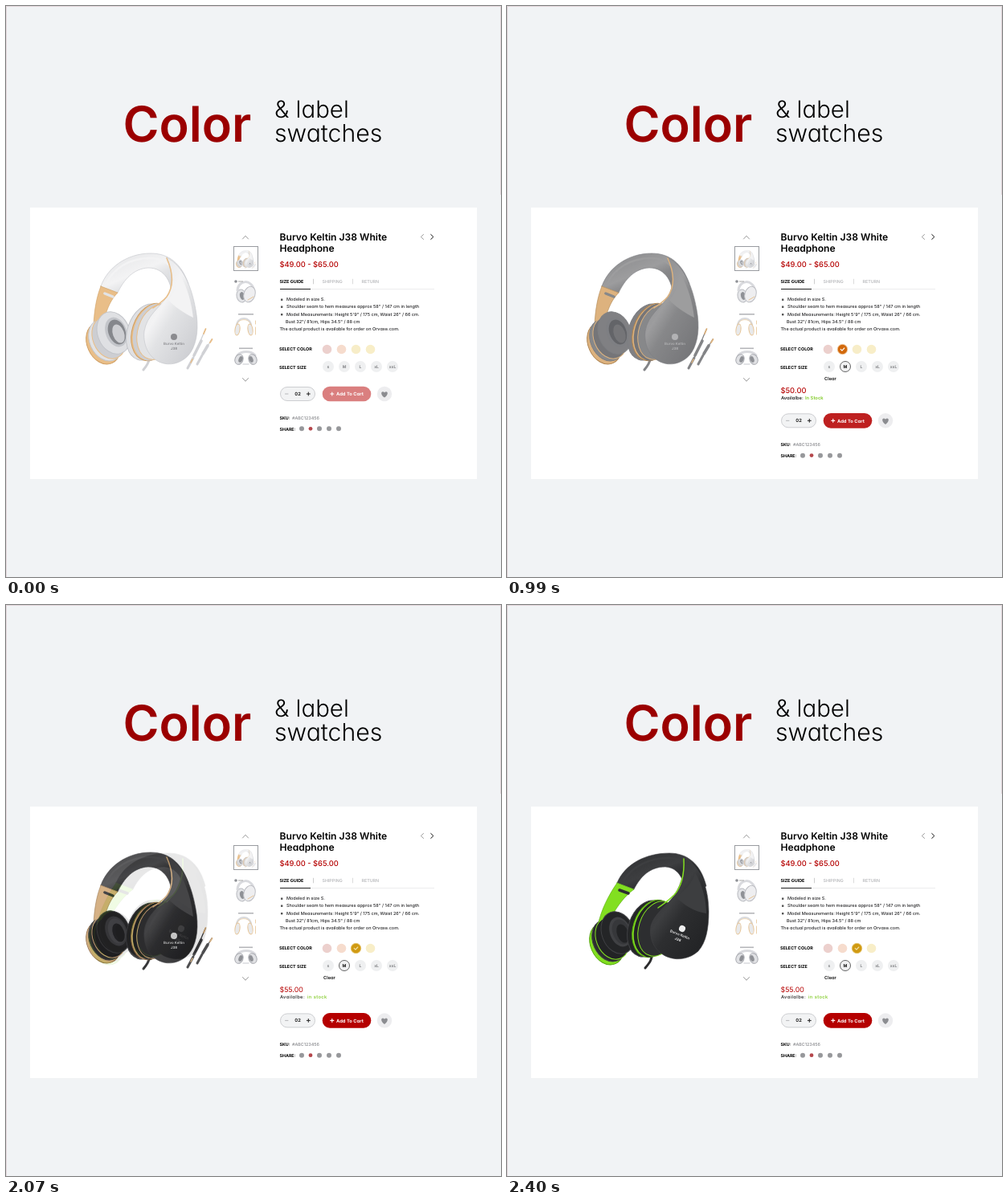
An HTML page that plays this animation: 616 px wide and 711 px high, repeating every 2.67 s.

```html
<!DOCTYPE html>
<html lang="en">
<head>
<meta charset="utf-8">
<title>Color and label swatches</title>
<style>
  html, body { margin: 0; width: 100%; height: 100%; overflow: hidden; background: #f1f3f5; }
  svg { display: block; width: 616px; height: 711px; font-family: Inter, "Open Sans", sans-serif; font-feature-settings: "cv11"; text-rendering: geometricPrecision; }
  #photos { isolation: isolate; }
  #photos > g { mix-blend-mode: plus-lighter; }
</style>
</head>
<body>
<svg id="stage" viewBox="0 0 616 711" xmlns="http://www.w3.org/2000/svg"></svg>
<script>
const LOOP = 2670, STEP = 30;
const RED = '#b50000';

const text = (x, y, size, weight, fill, str, extra = '') =>
  `<text x="${x}" y="${y}" font-size="${size}" font-weight="${weight}" fill="${fill}" ${extra}>${str}</text>`;
const path = (d, fill, stroke = 'none', width = 1) =>
  `<path d="${d}" fill="${fill}" stroke="${stroke}" stroke-width="${width}" stroke-linecap="round" stroke-linejoin="round"/>`;
const line = (d, color, width = 1) => path(d, 'none', color, width);
const rect = (x, y, w, h, fill, extra = '') =>
  `<rect x="${x}" y="${y}" width="${w}" height="${h}" fill="${fill}" ${extra}/>`;
const circle = (x, y, r, fill, extra = '') =>
  `<circle cx="${x}" cy="${y}" r="${r}" fill="${fill}" ${extra}/>`;
const oval = (x, y, rx, ry, turn, fill, stroke = 'none') =>
  `<ellipse rx="${rx}" ry="${ry}" transform="translate(${x} ${y}) rotate(${turn})" fill="${fill}" stroke="${stroke}"/>`;
const group = (id, body, extra = '') => `<g id="${id}" ${extra}>${body}</g>`;

const palettes = {
  white: { light: '#f3f3f4', mid: '#e2e3e5', dark: '#cdced2', pad: '#dfe0e3', edge: '#c3c5ca', hole: '#85878c', accent: '#e9be88', deep: '#cf9f64', ink: '#8b8b8f', wire: '#d0d1d5' },
  black: { light: '#454547', mid: '#2b2b2d', dark: '#1c1c1e', pad: '#1f1f21', edge: '#38383b', hole: '#404043', accent: '#cfa674', deep: '#8f6a40', ink: '#d8d8d8', wire: '#353537' },
  green: { light: '#3d3e40', mid: '#2d2e30', dark: '#222325', pad: '#242527', edge: '#404144', hole: '#36373a', accent: '#82df20', deep: '#56a80e', ink: '#eeeeee', wire: '#2b2b2d' }
};

const upright = {
  band: 'M118 349C126 326 150 308 180 308C202 308 218 320 227 346L206 366C208 346 198 326 177 326C159 327 147 340 139 357Z',
  sheen: 'M125 345C134 327 153 314 179 314C192 314 200 318 206 326',
  slider: 'M118 349L139 357C131 365 126 376 123 388L109 396C110 380 112 364 118 349Z',
  notch: 'M123 358L133 362',
  face: 'M200 313C221 324 231 350 236 378C240 400 238 418 230 431C222 443 208 448 196 445C180 441 170 425 172 405C175 385 192 375 200 362C208 350 208 332 200 313Z',
  gloss: 'M215 332C226 350 231 370 233 388C221 382 209 374 202 366C210 355 214 345 215 332Z',
  trim: 'M200 314C208 332 209 349 200 362C195 368 189 372 183 376',
  left: [121, 420], pad: [134, 407], ring: [183, 406], mark: [209, 412], turn: 0,
  wire: 'M179 436C178 444 175 448 171 453', mic: true
};
const tilted = {
  band: 'M137 346C147 322 173 309 202 309C224 309 241 322 248 350L218 365C224 346 215 327 197 326C178 326 166 338 158 354Z',
  sheen: 'M145 343C156 326 176 315 201 315C212 315 220 318 227 325',
  slider: 'M137 346L158 354C146 363 138 374 130 388L113 399C117 380 126 362 137 346Z',
  notch: 'M140 355L151 359',
  face: 'M220 314C241 326 251 352 251 382C251 402 248 420 238 431C228 440 214 443 202 439C186 434 176 418 179 400C183 384 200 374 209 360C218 346 221 330 220 314Z',
  gloss: 'M234 333C244 350 248 368 248 384C234 382 220 374 211 364C222 354 231 346 234 333Z',
  trim: 'M220 316C221 338 217 351 208 361C201 368 194 373 188 377',
  left: [124, 422], pad: [138, 408], ring: [183, 403], mark: [218, 403], turn: 22,
  wire: 'M180 432C181 441 178 445 172 452', mic: false
};

function headphone(id, shape, extra = '') {
  const c = palettes[id], [lx, ly] = shape.left, [px, py] = shape.pad, [rx, ry] = shape.ring;
  const shell = `url(#shell-${id})`;
  const label = `<g transform="translate(${shape.mark}) rotate(${shape.turn})" text-anchor="middle">
    ${circle(0, 0, 4, c.ink)}${text(0, 9.5, 4.4, 600, c.ink, 'Burvo Keltin')}${text(0, 16, 4.4, 700, c.ink, 'J38')}</g>`;
  const mic = !shape.mic ? '' :
    line('M226 451L233 438M238 446L244 435', c.wire, 3) + line('M233 438L248 403M244 435L256 415', c.wire, 1.3) +
    line('M234 435L243 417M245 433L251 423', c.wire, 3.6) + line('M246 408L248.5 402M254 419L256.5 415', c.accent, 1.8) +
    line('M230 444L232 440', c.accent, 1.6);
  return group(id,
    line(shape.wire, c.wire, 3) + mic +
    path(shape.band, shell, c.edge, .6) + line(shape.sheen, c.light, 2.5) +
    path(shape.slider, c.accent, c.deep, .6) + line(shape.notch, c.mid, 3.5) +
    oval(lx, ly, 20, 27, -24, c.accent, c.deep) + oval(lx + 3, ly - 4, 20, 27, -24, c.mid, c.edge) +
    oval(lx + 7, ly - 7, 20, 27, -22, c.dark, c.accent) +
    oval(px, py, 20, 27, -20, c.pad, c.edge) + oval(px + 3, py - 1, 13, 19, -20, c.edge) +
    oval(px + 4, py - 1, 10.5, 16, -20, c.hole) + oval(px + 6, py + 1, 7, 12, -20, c.dark) +
    oval(rx - 8, ry, 24, 36, 18, c.pad, c.edge) + oval(rx - 1, ry, 25, 36.5, 18, c.accent, c.deep) +
    oval(rx + 1, ry, 25, 36.5, 18, c.dark) + oval(rx + 5, ry, 24, 35, 18, c.mid, c.accent) +
    path(shape.face, shell, c.edge, .6) + path(shape.gloss, c.light) +
    line(shape.trim, c.accent, 1.5) + label, extra);
}

const gradients = Object.entries(palettes).map(([id, c]) =>
  `<linearGradient id="shell-${id}" x1="0" y1="0" x2=".8" y2="1"><stop stop-color="${c.mid}"/>
   <stop offset=".45" stop-color="${c.light}"/><stop offset=".6" stop-color="${c.mid}"/>
   <stop offset="1" stop-color="${c.dark}"/></linearGradient>`).join('');

function thumbnails() {
  const grey = '#d9dade', dark = '#8f9196', gold = '#e6c496';
  const side = oval(293, 361, 6, 8, -15, '#e4e5e8', '#b9bbc0') + oval(294, 361, 3, 5, -15, dark) +
    line('M288 354C289 341 306 339 309 355', grey, 3) + oval(303, 359, 7, 10, 18, '#eeeef0', '#bdbec3') +
    line('M301 366L308 362', gold) + circle(286, 343, 1.8, dark) + rect(289, 342.5, 6, 1, '#aaa');
  const front = rect(289, 383, 19, 1.6, '#b5b6ba') + line('M287 401C285 385 307 385 305 401', grey, 2.2) +
    line('M287 401C285 387 307 387 305 401', gold, .7) + oval(288, 403, 3, 7, 8, '#e8e9eb', gold) +
    oval(304, 403, 3, 7, -8, '#e8e9eb', gold) + line('M310.5 392V396M310.5 400V409', gold, .8);
  const folded = rect(290, 425.5, 17, 1.6, '#b5b6ba') + line('M288 435C293 429 305 429 310 435', grey, 3) +
    oval(290, 440, 5, 6.5, 20, '#e0e1e4', '#aaacb2') + oval(307, 440, 5, 6.5, -20, '#e0e1e4', '#aaacb2') +
    oval(292, 440, 2.5, 4, 20, dark) + oval(305, 440, 2.5, 4, -20, dark) + line('M295 446H302', grey, 1.5);
  return line('M294.5 290L298 286.2L301.5 290M294.5 463.5L298 467.3L301.5 463.5', '#999') +
    rect(283.5, 299.5, 30, 30, '#fff', 'stroke="#999ba0"') +
    '<use href="#white-small" transform="translate(270.5 255.5) scale(.158)"/>' + side + front + folded;
}

const colors = [399.5, 417.5, 435.5, 453.5];
const tints = ['#ecd0cd', '#f6dccd', '#f7edc8', '#f8eec8'];
const chosen = (id, x, fill, ring, tick) => group(id,
  circle(x, 427.5, 6.2, fill, `stroke="${ring}" stroke-width=".9"`) + line(`M${x - 2.3} 427.4l1.7 1.7l2.9-3.1`, tick, 1.1));

const details = [[349, 367, 'Modeled in size S.'],
  [349, 376, 'Shoulder seam to hem measures approx 58" / 147 cm in length'],
  [349, 386, 'Model Measurements: Height 5\'9" / 175 cm, Waist 26" / 66 cm.'],
  [348, 395, 'Bust 32"/ 81cm, Hips 34.5" / 88 cm'],
  [340.5, 404, 'The actual product is available for order on Orvaxe.com.']];

const sizes = ['s', 'M', 'L', 'xL', 'xxL'].map((s, i) =>
  circle(401 + 20 * i, 449, 7, '#eff0f1') +
  text(401 + 20 * i, 451, 5, 700, '#858689', s, 'text-anchor="middle"')).join('');

const info =
  text(340.5, 292, 12.1, 600, '#000', 'Burvo Keltin J38 White') + text(340.5, 306, 12.1, 600, '#000', 'Headphone') +
  line('M519.5 284.5L516.3 287.5L519.5 290.5', '#999') + line('M528.7 284.5L531.9 287.5L528.7 290.5', '#111') +
  text(340.5, 325, 9.3, 500, RED, '$49.00 - $65.00') +
  text(340.5, 345, 5.4, 700, '#000', 'SIZE GUIDE') + text(381.5, 345, 5.4, 400, '#888', '|') +
  text(393.5, 345, 5.3, 600, '#b9babd', 'SHIPPING') + text(430.5, 345, 5.4, 400, '#aaa', '|') +
  text(442.5, 345, 5.3, 600, '#b9babd', 'RETURN') +
  rect(341, 352, 192, 1, '#ececee') + rect(341, 352, 38, 1, '#222') +
  [365, 374, 383.5].map(y => rect(342, y - .5, 2.4, 2.4, '#555')).join('') +
  details.map(([x, y, s]) => text(x, y, 5.5, 500, '#262628', s)).join('') +
  text(340, 429.4, 5.4, 700, '#000', 'SELECT COLOR') + text(340, 452, 5.4, 700, '#000', 'SELECT SIZE') +
  colors.map((x, i) => circle(x, 427.5, 5.8, tints[i])).join('') + sizes +
  chosen('orange', colors[1], '#d2690c', '#f0c79a', '#fff') + chosen('ochre', colors[2], '#d09a12', '#e6c56b', '#f3e2a8') +
  group('medium', circle(421, 449, 6.5, '#f1f1f2', 'stroke="#666"') + text(421, 451, 5.2, 700, '#111', 'M', 'text-anchor="middle"')) +
  group('clear', text(395, 466, 5.7, 600, '#111', 'Clear'));

const stock = (id, price, size, weight, label, x, word, spacing) => group(id,
  text(340.5, 482, size, weight, RED, price) +
  text(341, 490.2, 5.8, weight + 100, '#222', label, `letter-spacing="${spacing}"`) +
  text(x, 490.2, 5.8, weight + 100, '#7cc81e', word, `letter-spacing="${spacing}"`));

const order = group('order',
  rect(341.5, 474.5, 43, 17, '#f2f3f4', 'rx="8.5" stroke="#cdced1"') +
  line('M347.5 483H351', '#b5b6b9') + text(363, 485.1, 5.8, 700, '#222', '02', 'text-anchor="middle"') +
  line('M374.3 483H378.3M376.3 481V485', '#222') +
  rect(393.7, 473.7, 60.6, 18.6, RED, 'id="button" rx="9.3"') +
  line('M403.8 483H407.8M405.8 481V485', '#fff', 1.1) + text(411, 485.2, 5.8, 700, '#fff', 'Add To Cart') +
  circle(471, 483, 9.2, '#ededef') +
  path('M471 487.6C466.4 484.6 466.2 480.2 469 480.2C470.2 480.2 471 481.2 471 481.8C471 481.2 471.8 480.2 473 480.2C475.8 480.2 475.6 484.6 471 487.6Z', '#8b8c90') +
  text(340.5, 515, 5.3, 700, '#000', 'SKU:') + text(356, 515, 5.4, 500, '#85868a', '#ABC123456') +
  text(340.5, 529, 5.3, 700, '#000', 'SHARE:') +
  [368, 379, 390, 402, 414].map((x, i) => circle(x, 526.3, i === 1 ? 2.4 : 3, i === 1 ? '#b5474c' : '#97989b')).join(''));

document.getElementById('stage').innerHTML =
  `<defs>${gradients}${headphone('white', upright).replace('id="white"', 'id="white-small"')}</defs>` +
  rect(0, 0, 616, 711, '#f1f3f5') +
  rect(0, 0, 616, 1, '#e2d6da') + rect(0, 0, 1, 711, '#e2d6da') + rect(615, 0, 1, 235, '#e2d6da') +
  text(145.5, 169, 61.2, 600, '#9b0000', 'Color') +
  text(334, 138.5, 29.4, 300, '#000', '&amp; label') + text(334, 168.5, 30.2, 300, '#000', 'swatches') +
  rect(30, 251, 556, 338, '#fff') +
  group('photos', headphone('white', upright) + headphone('black', upright) + headphone('green', tilted)) +
  thumbnails() + info +
  stock('offer50', '$50.00', 9.3, 500, 'Availalbe:', 371, 'In Stock', 0) +
  stock('offer55', '$55.00', 8.8, 400, 'Availalbe:', 375, 'in stock', .38) + order;

const el = Object.fromEntries([...document.querySelectorAll('#stage [id]')].map(n => [n.id, n]));
const clamp = v => Math.min(1, Math.max(0, v));
const inOut = p => p < .5 ? 4 * p ** 3 : 1 - 4 * (1 - p) ** 3;
const fade = (id, v) => el[id].setAttribute('opacity', v);
const show = (id, on) => fade(id, on ? 1 : 0);

function draw(time) {
  const t = Math.floor((time % LOOP) / STEP) * STEP;
  const first = clamp((t - 780) / 420), second = inOut(clamp((t - 1920) / 480));
  const blend = inOut(first), slide = 1 - (1 - first) ** 5;

  fade('white', 1 - blend);
  fade('black', blend * (1 - second));
  fade('green', second);

  show('orange', t >= 390 && t < 1590);
  show('ochre', t >= 1590);
  show('clear', t >= 390);
  show('medium', t >= 630);
  fade('offer50', t < 1650 ? slide : 0);
  show('offer55', t >= 1650);

  el.order.setAttribute('transform', `translate(0 ${34.4 * slide})`);
  el.button.setAttribute('opacity', 1 - .5 * (1 - first) ** 2);
}

const start = performance.now();
function tick() {
  draw(performance.now() - start);
  requestAnimationFrame(tick);
}
tick();
</script>
</body>
</html>
```
